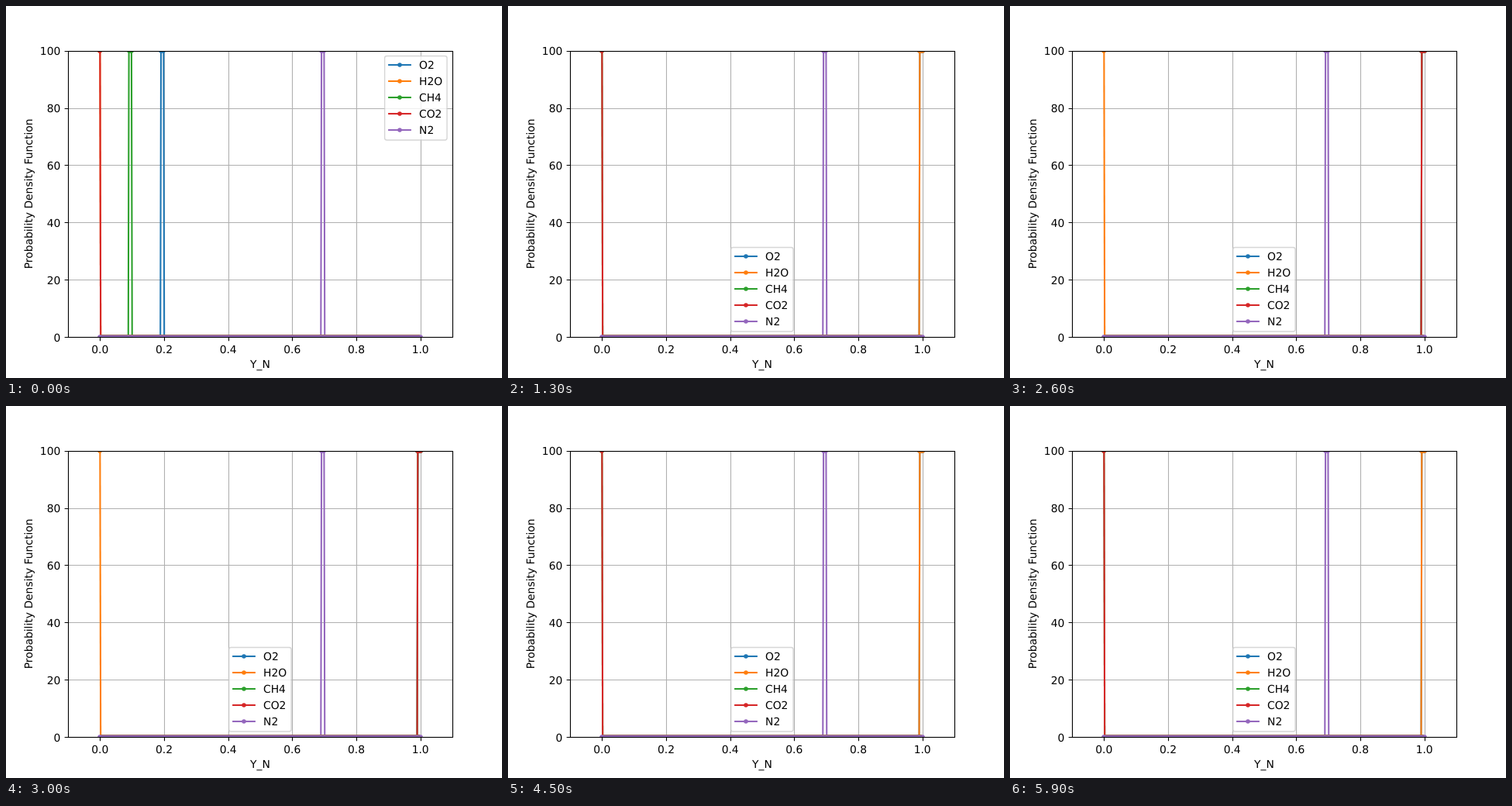
Animation of 640x480 px, one loop 6 s. Source, as an HTML page:

```html
<!DOCTYPE html>
<html lang="en">
<head>
<meta charset="utf-8">
<title>Probability density</title>
<style>
  html, body { margin: 0; width: 100%; height: 100%; overflow: hidden; background: #fff; }
  svg { display: block; width: 640px; height: 480px; }
  text { font-family: "DejaVu Sans", sans-serif; font-size: 13.89px; fill: #000; text-rendering: geometricPrecision; }
</style>
</head>
<body>
<svg id="stage" viewBox="0 0 640 480" xmlns="http://www.w3.org/2000/svg">
  <defs><clipPath id="area"><rect x="80" y="58" width="496" height="369"/></clipPath></defs>
  <rect width="640" height="480" fill="#fff"/>
  <g id="grid" stroke="#b0b0b0" stroke-width="1.11"></g>
  <g id="curves" clip-path="url(#area)" fill="none"></g>
  <g id="axes" stroke="#000" stroke-width="1.11" fill="none"></g>
  <g id="labels"></g>
  <g id="legend"></g>
</svg>
<script>
const NS = "http://www.w3.org/2000/svg";
const $ = id => document.getElementById(id);

function add(parent, tag, attrs, text) {
  const el = document.createElementNS(NS, tag);
  for (const k in attrs) el.setAttribute(k, attrs[k]);
  if (text !== undefined) el.textContent = text;
  parent.appendChild(el);
  return el;
}

const LEFT = 80, RIGHT = 576, TOP = 57.6, BOTTOM = 427.2;
const LINE = 2.083, DOT = 5.556, POINTS = 500, STEP = 100, LOOP = 6000;
const px = v => LEFT + (v + 0.1) / 1.2 * (RIGHT - LEFT);
const py = v => BOTTOM - v / 100 * (BOTTOM - TOP);
const snap = v => Math.floor(v + 0.5) + 0.5;
const at = k => px(k / (POINTS - 1));

const species = [
  ["O2", "#1f77b4"], ["H2O", "#ff7f0e"], ["CH4", "#2ca02c"],
  ["CO2", "#d62728"], ["N2", "#9467bd"]
];

// Each pulse spans the sample indices first..last
const zero = [0, 0], one = [495, 499], n2 = [345, 349];
const start = [[95, 99], zero, [45, 49], zero, n2];
const wet = [one, one, zero, zero, n2];
const dry = [one, zero, one, one, n2];

function buildAxes() {
  const grid = $("grid"), axes = $("axes"), labels = $("labels");
  for (let i = 0; i <= 5; i++) {
    const x = snap(px(i / 5)), y = snap(py(i * 20));
    add(grid, "path", { d: `M${x} 58V427` });
    if (i > 0 && i < 5) add(grid, "path", { d: `M80 ${y}H576` });
    add(axes, "path", { d: `M${x} 427.5v4.86M80.5 ${y}h-4.86` });
    add(labels, "text", { x: px(i / 5), y: 448, "text-anchor": "middle" }, (i / 5).toFixed(1));
    add(labels, "text", { x: 70.3, y: py(i * 20) + 5.3, "text-anchor": "end" }, i * 20);
  }
  add(axes, "rect", { x: 80.5, y: 58.5, width: 496, height: 369 });
  add(labels, "text", { x: 328, y: 467.3, "text-anchor": "middle" }, "Y_N");
  add(labels, "text", { transform: "translate(34 242.4) rotate(-90)", "text-anchor": "middle" },
    "Probability Density Function");
}

function buildLegend() {
  const g = $("legend");
  add(g, "rect", {
    x: 488.6, y: 64.54, width: 80.46, height: 108.5, rx: 2.78,
    fill: "#fff", stroke: "#ccc", "stroke-width": 1.389, opacity: 0.8
  });
  species.forEach(([name, color], i) => {
    const y = 76 + 21 * i;
    add(g, "path", { d: `M493.1 ${y}H522.9`, stroke: color, "stroke-width": LINE });
    add(g, "circle", { cx: 508, cy: y, r: DOT / 2, fill: color });
    add(g, "text", { x: 533, y: y + 5 }, name);
  });
}

function buildCurves() {
  const g = $("curves");
  const curves = species.map(([, color]) => ({
    line: add(g, "path", { stroke: color, "stroke-width": LINE, "stroke-linejoin": "round" }),
    dots: add(g, "path", { stroke: color, "stroke-width": DOT, "stroke-linecap": "round" })
  }));
  const base = species[4][1];
  add(g, "path", { d: "M121 427H535", stroke: base, "stroke-width": DOT, "stroke-linecap": "round" });
  // Overlapping dot edges blend to brown along the top of the baseline
  add(g, "path", { d: "M122 424.5H534", stroke: "#98685f", "stroke-width": 1 });
  return curves;
}

function pulsePath([a, b]) {
  const pts = [];
  if (a > 0) pts.push([at(a - 1), BOTTOM]);
  pts.push([at(a), TOP], [at(b), TOP]);
  if (b < POINTS - 1) pts.push([at(b + 1), BOTTOM]);
  return "M" + pts.map(p => p.map(v => v.toFixed(2)).join(" ")).join("L");
}

buildAxes();
buildLegend();
const curves = buildCurves();
let shown = null;

function draw(ms) {
  const n = Math.floor((ms % LOOP) / STEP);
  const state = n < 2 ? start : n % 2 ? wet : dry;
  if (state === shown) return;
  shown = state;
  curves.forEach((c, i) => {
    const [a, b] = state[i];
    c.line.setAttribute("d", pulsePath(state[i]));
    c.dots.setAttribute("d", `M${Math.round(at(a))} 58H${Math.round(at(b)) + 0.01}`);
  });
  $("legend").setAttribute("transform", state === start ? "" : "translate(-201 247)");
}

const t0 = performance.now();
function tick() {
  draw(performance.now() - t0);
  requestAnimationFrame(tick);
}
tick();
</script>
</body>
</html>
```
